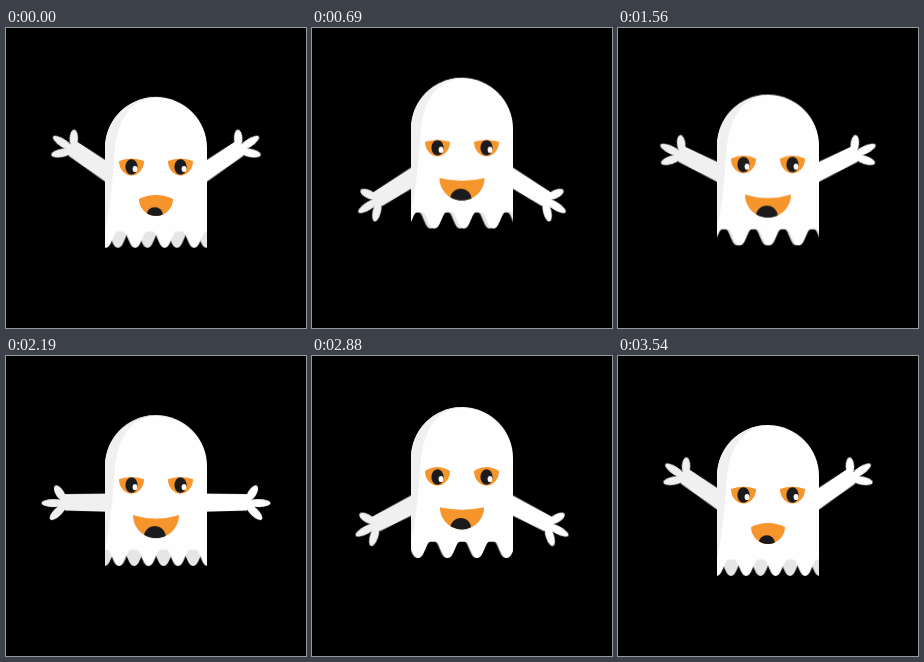
Write an HTML page without scripts that moves like this. It is 300 px wide and 300 px high and loops after 3.57 s.

```html
<!DOCTYPE html>
<html lang="en">
<head>
<meta charset="utf-8">
<title>Waving ghost</title>
<style>
  html, body { margin: 0; width: 100%; height: 100%; overflow: hidden; background: #000; }
  svg { display: block; width: 100vw; height: 100vh; }

  .ghost, .arm, .mouth, .tongue, .lid {
    animation: 3570ms cubic-bezier(.364, 0, .636, 1) -42ms infinite;
  }
  .ghost { animation-name: float; }
  .arm { animation-name: wave; }
  .mouth { animation-name: smile; }
  .tongue { animation-name: open; }
  .lid { animation-name: squint; }
  .front, .back { animation: ripple 892.5ms linear -35ms infinite; }
  .back { animation-direction: reverse; }

  .white { fill: #fefefe; }
  .pale { fill: #f0f0f0; }
  .shade { fill: #e6e6e6; }
  .orange { fill: #f7952d; }
  .dark { fill: #1b1a1c; }

  /* The final swing is slightly shorter than the others. */
  @keyframes float {
    0%, 50.42%, 100% { transform: translateY(69px); }
    25.21% { transform: translateY(48px); }
    75.63% { transform: translateY(48px); animation-timing-function: cubic-bezier(.365, 0, .641, .943); }
  }
  @keyframes wave {
    0%, 50.42%, 100% { transform: rotate(34deg); }
    25.21% { transform: rotate(-38.5deg); }
    75.63% { transform: rotate(-38.5deg); animation-timing-function: cubic-bezier(.365, 0, .641, .943); }
  }
  @keyframes ripple {
    from { transform: translateX(0); }
    to { transform: translateX(29.5px); }
  }
  @keyframes smile {
    0%, 100% { d: path("M133 102Q150 94 167 102C167 111.4 159.4 119 150 119C140.6 119 133 111.4 133 102Z"); }
    25.21%, 75.63% { d: path("M127 100Q150 107 173 100C173 112.7 162.7 123 150 123C137.3 123 127 112.7 127 100Z"); }
  }
  @keyframes open {
    0%, 100% { r: 8.2px; cy: 118.4px; }
    25.21%, 75.63% { r: 11px; cy: 122px; }
  }
  @keyframes squint {
    0%, 100% { d: path("M113 64Q125.5 59.4 138 64A12.5 14.4 0 0 1 113 64Z"); }
    11.2% { d: path("M113 64Q125.5 64 138 64A12.5 14.4 0 0 1 113 64Z"); }
    31.4%, 81.8% { d: path("M113 64Q125.5 56 138 64A12.5 14.4 0 0 1 113 64Z"); }
    44.8% { d: path("M113 64Q125.5 58 138 64A12.5 14.4 0 0 1 113 64Z"); }
    62.5% { d: path("M113 64Q125.5 60.2 138 64A12.5 14.4 0 0 1 113 64Z"); }
  }
</style>
</head>
<body>
<svg viewBox="0 0 300 300">
  <defs>
    <g id="limb">
      <path d="M6-9.5L-46-9L-51 0L-46 7.5L6 9Z"/>
      <ellipse cx="-57.5" rx="12" ry="4"/>
      <ellipse rx="9" ry="4.2" transform="translate(-51.1 -9.8) rotate(58)"/>
      <ellipse rx="10.5" ry="4.1" transform="translate(-53.3 9) rotate(-44)"/>
    </g>
    <path id="hem" d="M39.5 120V151
      c6 0 8-16.5 12-16.5h5.5c4 0 6 16.5 12 16.5
      c6 0 8-16.5 12-16.5h5.5c4 0 6 16.5 12 16.5
      c6 0 8-16.5 12-16.5h5.5c4 0 6 16.5 12 16.5
      c6 0 8-16.5 12-16.5h5.5c4 0 6 16.5 12 16.5
      c6 0 8-16.5 12-16.5h5.5c4 0 6 16.5 12 16.5
      c6 0 8-16.5 12-16.5h5.5c4 0 6 16.5 12 16.5V120Z"/>
    <clipPath id="sides"><rect x="99" y="110" width="102" height="50"/></clipPath>
    <clipPath id="eyeShape">
      <path class="lid" d="M113 64Q125.5 59.4 138 64A12.5 14.4 0 0 1 113 64Z"/>
    </clipPath>
    <clipPath id="mouthShape">
      <path class="mouth" d="M133 102Q150 94 167 102C167 111.4 159.4 119 150 119C140.6 119 133 111.4 133 102Z"/>
    </clipPath>
    <g id="eye" clip-path="url(#eyeShape)">
      <rect class="orange" x="112" y="55" width="27" height="26"/>
      <ellipse class="dark" cx="125.5" cy="70" rx="6.1" ry="7.8"/>
      <ellipse class="white" cx="129" cy="72" rx="2.4" ry="3.1"/>
    </g>
  </defs>

  <rect width="300" height="300"/>
  <g transform="translate(105 147)">
    <g class="arm"><use href="#limb" class="pale"/></g>
  </g>
  <g transform="translate(195 147) scale(-1 1)">
    <g class="arm"><use href="#limb" class="white"/></g>
  </g>

  <g class="ghost">
    <g clip-path="url(#sides)">
      <g class="back"><use href="#hem" class="shade" x="-14.75"/></g>
      <g class="front"><use href="#hem" class="white"/></g>
    </g>
    <path class="white" d="M99 125V51A51 51 0 0 1 201 51V125Z"/>
    <path class="pale" d="M150 0A51 51 0 0 0 99 51V134C103 118 106 92 108.5 56C111 24 123 3 150 0Z"/>
    <use href="#eye"/>
    <use href="#eye" x="49"/>
    <g clip-path="url(#mouthShape)">
      <rect class="orange" x="125" y="94" width="50" height="32"/>
      <circle class="tongue dark" cx="148.8" cy="118.4" r="8.2"/>
    </g>
  </g>
</svg>
</body>
</html>
```
